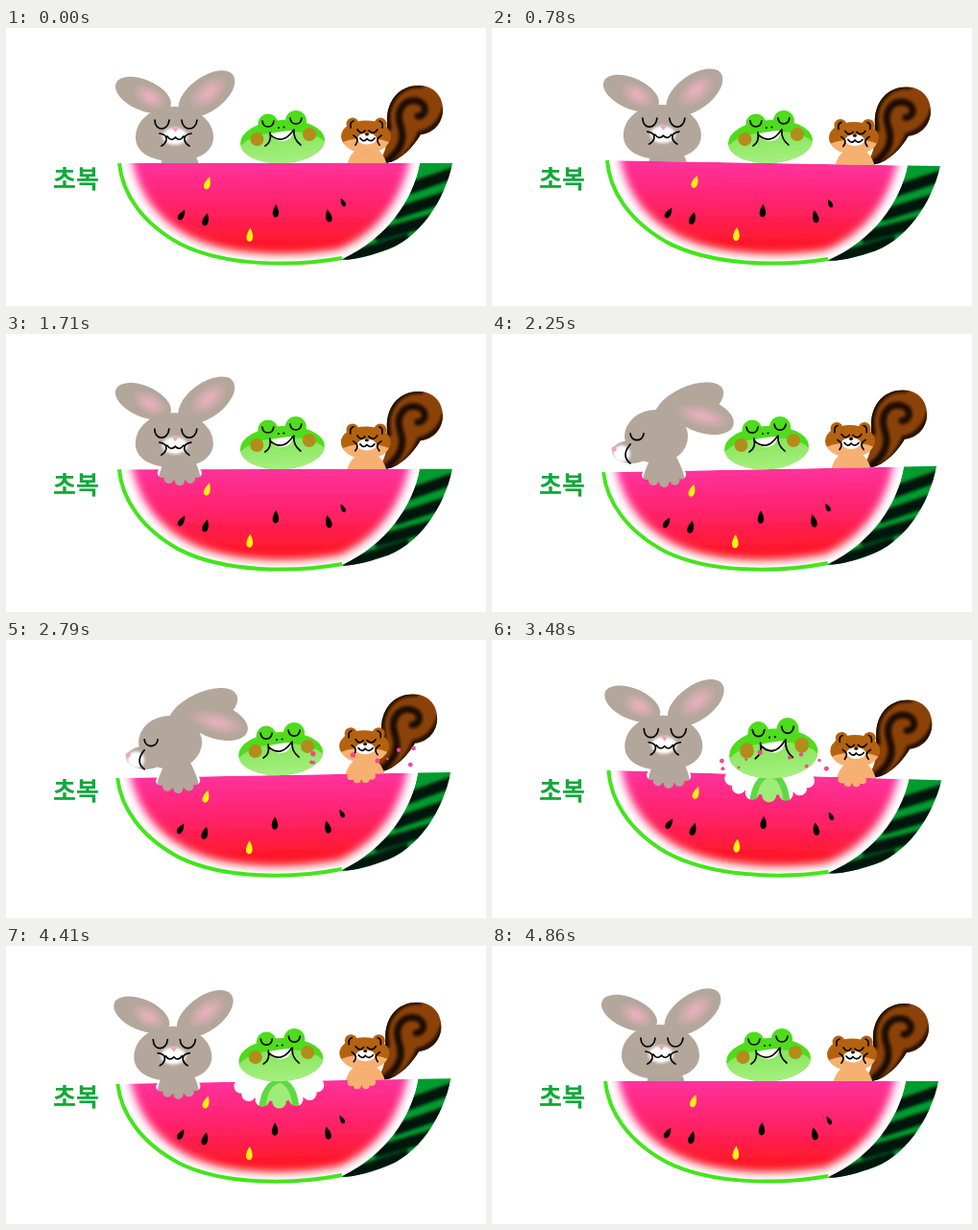
Recreate the animation shown at these times as an HTML page. Size 500x290 px, loop 4890 ms.

```html
<!DOCTYPE html>
<html lang="ko">
<head>
<meta charset="utf-8">
<title>초복</title>
<style>
html, body { margin: 0; width: 100%; height: 100%; overflow: hidden; background: #fff; }
svg { display: block; width: 500px; height: 290px; }
.ink { fill: none; stroke: #000; stroke-width: 1.7; stroke-linecap: round; stroke-linejoin: round; }
.fur { fill: #b3a69a; }
.title { font: 700 26px "Noto Sans CJK KR", "Noto Sans CJK", sans-serif; fill: #12a83a; }
</style>
</head>
<body>
<svg viewBox="0 0 500 290">
  <defs>
    <filter id="soft" x="-20%" y="-20%" width="140%" height="140%"><feGaussianBlur stdDeviation="4"/></filter>
    <filter id="fuzz" x="-30%" y="-30%" width="160%" height="160%"><feGaussianBlur stdDeviation="1.4"/></filter>
    <linearGradient id="flesh" gradientUnits="userSpaceOnUse" x1="0" y1="141" x2="0" y2="230">
      <stop offset="0" stop-color="#ff329c"/><stop offset=".45" stop-color="#ff2470"/><stop offset="1" stop-color="#ff1722"/>
    </linearGradient>
    <radialGradient id="inner"><stop offset=".2" stop-color="#e2afba"/><stop offset="1" stop-color="#b3a69a"/></radialGradient>
    <linearGradient id="skin" x1="0" y1="0" x2="0" y2="1">
      <stop offset="0" stop-color="#86e45a"/><stop offset="1" stop-color="#adf388"/>
    </linearGradient>
    <clipPath id="face"><path d="M117 141H431C424 180 396 220 350 241C300 250 228 250 180 226C140 204 120 172 117 141Z"/></clipPath>
    <clipPath id="side"><path id="rind" d="M431 141H465C457 180 430 222 392 233C375 239 360 242 348 242C394 220 424 180 431 141Z"/></clipPath>
    <clipPath id="tailClip"><path id="tailShape" d="M386 141C400 128 396 112 397 98C396 78 408 60 430 60C447 60 456 73 455 87C454 102 442 111 432 111C424 124 412 138 396 141Z"/></clipPath>
    <clipPath id="frogClip"><ellipse cx="288" cy="118.5" rx="44" ry="22.5"/></clipPath>
    <mask id="bites" maskUnits="userSpaceOnUse" x="0" y="0" width="500" height="290">
      <rect width="500" height="290" fill="#fff"/>
      <g id="holes"></g>
    </mask>
    <path id="seed" d="M0-7C4-1 4.500 6 0 6.500C-4.500 6 -4-1 0-7Z"/>
  </defs>

  <text class="title" x="49" y="167">초복</text>

  <g id="backRabbit"><path class="fur" d="M158 172C157 148 162 138 168 126H194C200 138 205 148 204 172Z"/></g>
  <g id="backFrog"><g id="frogBody">
    <path fill="#5fd843" d="M264 176C266 150 274 140 287 138C300 140 306 150 308 176Z"/>
    <path fill="#a0ec78" d="M272 176C272 154 278 145 287 143C294 145 300 154 301 176Z"/>
  </g></g>
  <g id="backSquirrel">
    <g id="tail">
      <use href="#tailShape" fill="#8b4208"/>
      <g clip-path="url(#tailClip)" fill="none" stroke="#1a0b02" stroke-width="7" stroke-linecap="round" filter="url(#fuzz)">
        <path d="M390 143C412 130 416 116 411 102C405 84 416 74 428 76C440 79 438 92 429 92"/>
        <path d="M398 104C392 76 412 57 432 59"/>
        <path d="M457 84C453 100 441 108 431 110C426 124 412 140 402 141" stroke-width="5"/>
      </g>
    </g>
    <path fill="#f6b172" d="M353 158C354 138 360 130 366 126H386C392 130 398 138 399 158Z"/>
  </g>

  <g id="melon"><g mask="url(#bites)">
    <use href="#rind" fill="#009c2f"/>
    <g clip-path="url(#side)"><g stroke="#03140a" stroke-width="12" filter="url(#fuzz)">
      <path d="M418 168L470 150M404 194L462 175M384 217L448 199M352 241L420 220"/>
    </g></g>
    <g clip-path="url(#face)">
      <rect x="110" y="141" width="330" height="110" fill="#fff"/>
      <path fill="url(#flesh)" filter="url(#soft)" d="M129 126H423C415 175 390 212 347 231C300 239 232 239 190 217C152 197 134 165 129 126Z"/>
    </g>
    <path fill="none" stroke="#43e51b" stroke-width="4" d="M118 141C121 172 141 203 181 225C228 249 300 249 350 240"/>
    <g id="pips"></g>
  </g></g>

  <g id="rabbit">
    <g id="rabbitFront">
      <g id="ears">
        <ellipse class="fur" cx="143" cy="70" rx="31" ry="16" transform="rotate(24 143 70)"/>
        <ellipse fill="url(#inner)" cx="150" cy="72" rx="20" ry="12" transform="rotate(30 150 72)"/>
        <ellipse class="fur" cx="209" cy="69" rx="34" ry="18" transform="rotate(-36 209 69)"/>
        <ellipse fill="url(#inner)" cx="211" cy="67" rx="24" ry="13" transform="rotate(-38 211 67)"/>
      </g>
      <path class="fur" d="M175 82C199 82 216 97 216 114C216 129 200 139 175 139C150 139 135 129 135 114C135 97 151 82 175 82Z"/>
      <g id="rabbitFace">
        <ellipse cx="176" cy="113" rx="13" ry="9" fill="#fff" filter="url(#fuzz)"/>
        <path d="M173 104H180L176.500 109Z" fill="#f4a3b5"/>
        <path class="ink" d="M155 96C155 108 169 108 170 96M183 96C184 108 198 108 199 96M168 113Q172 119 176.500 114Q181 119 185 113M160 110Q168 111 167 117Q166 121 162 123M193 110Q185 111 186 117Q187 121 191 123"/>
      </g>
    </g>
    <g id="rabbitSide">
      <ellipse class="fur" cx="207" cy="72" rx="39" ry="19" transform="rotate(-25 207 72)"/>
      <ellipse class="fur" cx="221" cy="83" rx="34" ry="18" transform="rotate(18 221 83)"/>
      <ellipse fill="url(#inner)" cx="222" cy="84" rx="31" ry="12" transform="rotate(14 222 84)"/>
      <ellipse class="fur" cx="173" cy="105" rx="33" ry="28"/>
      <ellipse class="fur" cx="147" cy="121" rx="20" ry="12"/>
      <ellipse cx="137" cy="123" rx="9" ry="9" fill="#fff" filter="url(#fuzz)"/>
      <circle cx="129" cy="118" r="2.500" fill="#f4a3b5"/>
      <path class="ink" d="M146 102C147 111 159 111 160 102M146 113Q136 125 146 133"/>
    </g>
  </g>

  <g id="frog">
    <g id="frogFront">
      <g fill="#4edc1c"><circle cx="273" cy="100" r="10.500"/><circle cx="302" cy="97" r="11"/></g>
      <g transform="rotate(-3 288 118)">
        <ellipse cx="288" cy="118.500" rx="44" ry="22.500" fill="#4edc1c"/>
        <g clip-path="url(#frogClip)"><ellipse cx="288" cy="128" rx="47" ry="20" fill="url(#skin)"/></g>
      </g>
      <g fill="#b38c1c"><circle cx="261.500" cy="116" r="7"/><circle cx="316" cy="111" r="7"/></g>
      <path d="M275 111Q288 107 299 107Q299 117 288 118Q280 118 275 111Z" fill="#fff"/>
      <path class="ink" d="M275 111Q288 123 299 107M270 123Q277 119 275 109M307 122Q299 116 300 106"/>
      <path id="frogEyes" class="ink" d="M267 97C268 105 278 105 279 97M296 94C297 102 307 102 308 94"/>
      <g><circle cx="284" cy="104" r="1"/><circle cx="289.500" cy="103.500" r="1"/></g>
    </g>
    <g id="frogUp">
      <rect x="247.500" y="91" width="96" height="55" rx="33" ry="25" fill="#4edc1c"/>
      <rect x="247.500" y="93" width="96" height="53" rx="33" ry="25" fill="url(#skin)"/>
      <g fill="#b38c1c"><ellipse cx="269" cy="98" rx="7" ry="5"/><ellipse cx="321" cy="98" rx="7" ry="5"/></g>
      <path d="M282 95Q295 92 306 95Q295 100 282 95Z" fill="#fff"/>
      <path class="ink" d="M282 94Q295 100 306 94M278 106Q283 101 281 93M312 106Q305 101 307 93"/>
      <circle cx="294.500" cy="93.500" r="1"/><circle cx="298.500" cy="93.500" r="1"/>
    </g>
  </g>

  <g id="squirrel">
    <g id="squirrelFront">
      <g fill="#b4620f"><circle cx="361" cy="100" r="6.500"/><circle cx="390" cy="100" r="6.500"/></g>
      <ellipse cx="375" cy="113" rx="26" ry="16.500" fill="#b4620f"/>
      <path d="M351 119Q375 110 399 119Q393 130 375 130Q357 130 351 119Z" fill="#f6b172"/>
      <ellipse cx="376" cy="115.500" rx="10" ry="6" fill="#fff"/>
      <ellipse cx="376" cy="111" rx="2" ry="1.400"/>
      <path class="ink" d="M366 106Q370 112 374 107M378 107Q383 112 387 106M369 115Q373 120 376 115.500Q380 120 384 115M362 112Q369 116 364 122M391 112Q384 116 389 122M359 104Q358 98 362 97M392 104Q393 98 389 97"/>
    </g>
    <g id="squirrelSide">
      <circle cx="367" cy="99" r="7" fill="#b4620f"/>
      <ellipse cx="376" cy="113" rx="25" ry="17" fill="#b4620f"/>
      <ellipse cx="391" cy="119" rx="13" ry="9" fill="#f6b172"/>
      <ellipse cx="396" cy="118" rx="6" ry="6" fill="#fff"/>
      <path class="ink" d="M381 107Q386 113 391 107M388 113Q396 119 389 126"/>
      <circle cx="402" cy="115" r="1.800"/>
    </g>
  </g>
  <g id="fx"></g>
</svg>

<script>
const $ = id => document.getElementById(id);
const FRAMES = 108, LOOP = 4890, PIVOT = { x: 290, y: 250 }, RIM = 141;

function add(parent, tag, attrs) {
  const el = document.createElementNS("http://www.w3.org/2000/svg", tag);
  for (const key in attrs) el.setAttribute(key, attrs[key]);
  return parent.appendChild(el);
}
const show = (id, on) => $(id).setAttribute("display", on ? "inline" : "none");
const move = (id, x, y, extra = "") => $(id).setAttribute("transform", `translate(${x} ${y}) ${extra}`);
const during = (k, from, to) => k >= from && k <= to;

// Melon seeds: x, y, tilt, size, yellow
[[183, 195, 32, .9, 0], [208, 200, 16, 1, 0], [281, 191, 2, 1, 0], [336, 196, -12, 1, 0],
 [351, 182, -28, .7, 0], [210, 162, 18, 1, 1], [254, 216, 4, 1.05, 1]].forEach(([x, y, tilt, size, gold]) =>
  add($("pips"), "use", { href: "#seed", fill: gold ? "#ffef14" : "#000",
    transform: `translate(${x} ${y}) rotate(${tilt}) scale(${size})` }));

// Each eater bites, chews, then spits seeds along (dx, dy)
const eaters = [
  { id: "Rabbit", x: 181, rx: 22, ry: 12, lobes: 5, bite: 29, mouth: [176, 118], spit: 53, from: [127, 125], dx: -20, dy: 0 },
  { id: "Squirrel", x: 372, rx: 14, ry: 6, lobes: 4, bite: 58, mouth: [376, 118], spit: 65, from: [404, 119], dx: 20, dy: 0 },
  { id: "Frog", x: 286, rx: 45, ry: 21, lobes: 7, bite: 73, mouth: [290, 120], spit: 81, from: [295, 92], dx: 0, dy: -20 }
];

let state = 11;
const rand = () => (state = state * 16807 % 2147483647) / 2147483647;

for (const e of eaters) {
  e.hole = add($("holes"), "g", { fill: "#000" });
  add(e.hole, "ellipse", { cx: e.x, cy: RIM, rx: e.rx - 2, ry: e.ry });
  const r = e.rx / e.lobes * 1.15;
  for (let i = 0; i < e.lobes; i++) {
    const a = Math.PI * (i + .5) / e.lobes;
    add(e.hole, "circle", { cx: e.x + Math.cos(a) * (e.rx - r * .6), cy: RIM + Math.sin(a) * e.ry, r });
  }
  e.drops = Array.from({ length: 10 }, (_, i) => ({
    vx: (i % 2 ? 1 : -1) * (3 + rand() * 11), vy: -4.5 + rand() * 4.5,
    el: add($("fx"), "circle", { r: 1.3 + rand() * 1.5, fill: "#f5468c" })
  }));
  e.shots = [0, 1, 2].map(() => add($("fx"), "use", { href: "#seed" }));
}

// Sway angle in radians, eased between turning points
const turns = [[0, 0], [4, -.01], [15, .025], [25, -.055], [37, 0], [46, -.046], [56, .035],
  [66, -.045], [76, .031], [91, -.056], [104, .016], [108, 0]];
function sway(k) {
  const i = Math.max(1, turns.findIndex(p => p[0] >= k));
  const [k0, a] = turns[i - 1], [k1, b] = turns[i];
  return a + (b - a) * (1 - Math.cos(Math.PI * (k - k0) / (k1 - k0))) / 2;
}

function headOffset(e, k) {
  const t = k - e.bite;
  if (t < -4 || k >= FRAMES) return 0;
  if (t <= 2) return 15 * Math.sin(Math.PI * (t + 4) / 6);
  return k < e.spit - 2 ? Math.sin(t * Math.PI / 3) : 0;
}

function drawEater(e, k, angle) {
  const x = (PIVOT.y - RIM) * angle, y = (e.x - PIVOT.x) * angle;
  move("back" + e.id, x, y);
  move(e.id.toLowerCase(), x, y + headOffset(e, k));
  e.hole.setAttribute("display", k >= e.bite && k < FRAMES ? "inline" : "none");

  const t = k - e.bite;
  for (const d of e.drops) {
    d.el.setAttribute("display", during(t, 1, 7) ? "inline" : "none");
    d.el.setAttribute("cx", e.mouth[0] + x + d.vx * t);
    d.el.setAttribute("cy", e.mouth[1] + y + d.vy * t + .9 * t * t);
  }
  e.shots.forEach((el, i) => {
    const s = k - e.spit - i, spread = (i - 1) * s;
    const px = e.from[0] + x + e.dx * s + (e.dx ? 0 : spread);
    const py = e.from[1] + y + e.dy * s + (e.dx ? spread : 0);
    el.setAttribute("display", during(s, 0, 8) ? "inline" : "none");
    el.setAttribute("transform", `translate(${px} ${py}) rotate(${e.dx * 4.5}) scale(.8)`);
  });
}

function render(k) {
  const angle = sway(k);
  $("melon").setAttribute("transform", `rotate(${angle * 180 / Math.PI} ${PIVOT.x} ${PIVOT.y})`);
  for (const e of eaters) drawEater(e, k, angle);

  const side = during(k, 50, 68), aside = during(k, 64, 71), up = during(k, 80, 95);
  show("rabbitFront", !side);
  show("rabbitSide", side);
  show("squirrelFront", !aside);
  show("squirrelSide", aside);
  show("frogFront", !up);
  show("frogUp", up);
  show("frogBody", during(k, 73, 107));

  move("rabbitFace", 0, during(k, 29, 49) ? 3 : 0);
  const puffed = during(k, 74, 79);
  move("frogFront", puffed ? 2 : 0, puffed ? 1 : 0,
    puffed ? "translate(288 119) scale(1.05 1.15) translate(-288 -119)" : "");
  const chewing = during(k, 59, 63) ? -2 : 0;
  move("tail", chewing * 2, chewing);
}

// Steps alternate between 60 and 30 ms
function tick() {
  const t = performance.now() % LOOP;
  render(Math.min(FRAMES, 2 * Math.floor(t / 90) + (t % 90 >= 60 ? 1 : 0)));
  requestAnimationFrame(tick);
}
tick();
</script>
</body>
</html>
```
